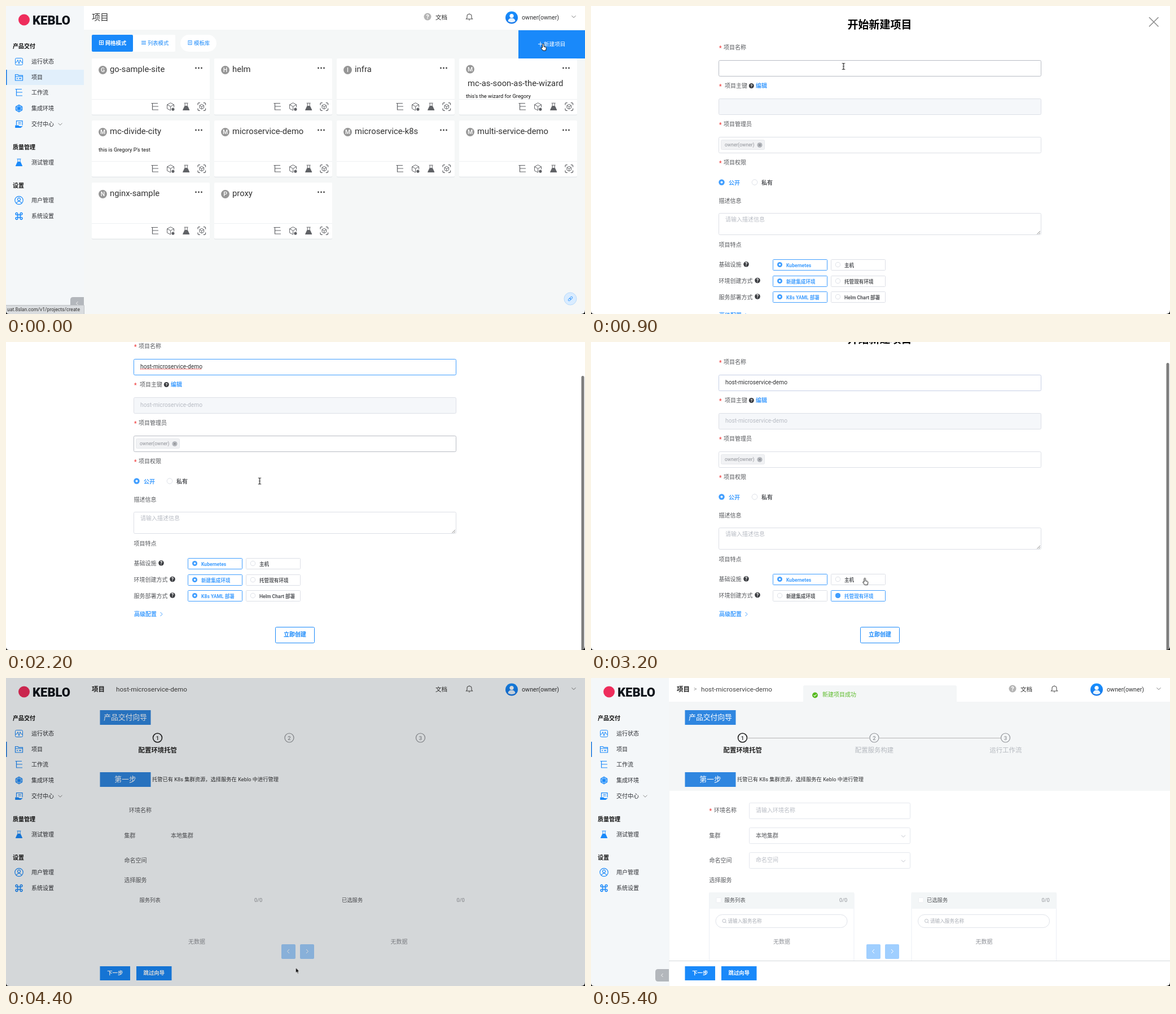
Animation of 1026x546 px, one loop 5500 ms. Source, as an HTML page:

```html
<!DOCTYPE html>
<html lang="zh-CN">
<head>
<meta charset="utf-8">
<title>新建项目</title>
<style>
html, body { margin: 0; width: 100%; height: 100%; overflow: hidden; background: #fff; }
svg { display: block; width: 1026px; height: 546px; }
text { font-family: Roboto, "Noto Sans CJK SC", "Noto Sans CJK", sans-serif; white-space: pre; }
[id^="k-"] { animation: 5500ms step-end infinite; }
.typed tspan { animation: typed 5500ms step-end infinite; }
@keyframes typed { 0% { fill-opacity: 1; } 60%, 100% { fill-opacity: 0; } }
</style>
</head>
<body>
<svg id="stage" viewBox="0 0 1026 546" xmlns="http://www.w3.org/2000/svg"></svg>
<script>
const LOOP = 5500;
const BLUE = '#1989fa', SKY = '#409eff', INK = '#303133', MID = '#56585c',
      PALE = '#b8bcc4', EDGE = '#dcdfe6', SIDE = '#f4f7f9', GROUND = '#f4f6f7';
const PROJECT = 'host-microservice-demo', BRAND = 'Keblo', USER = 'owner(owner)';

// ---- drawing helpers; text is placed by its vertical centre ----
const text = (x, y, s, size = 10, fill = INK, weight = 400, more = '') =>
  `<text x="${x}" y="${(y + size * .37).toFixed(2)}" font-size="${size}" fill="${fill}" font-weight="${weight}" ${more}>${s}</text>`;
const mid = (x, y, s, size, fill, weight) => text(x, y, s, size, fill, weight, 'text-anchor="middle"');
const rect = (x, y, w, h, fill, stroke = 'none', r = 0, more = '') =>
  `<rect x="${x}" y="${y}" width="${w}" height="${h}" fill="${fill}" stroke="${stroke}" rx="${r}" ${more}/>`;
const disc = (x, y, r, fill, stroke = 'none', w = 1) =>
  `<circle cx="${x}" cy="${y}" r="${r}" fill="${fill}" stroke="${stroke}" stroke-width="${w}"/>`;
const path = (d, stroke, w = 1, fill = 'none') =>
  `<path d="${d}" stroke="${stroke}" stroke-width="${w}" fill="${fill}"/>`;
const group = (body, id = '', more = '') => `<g ${id && `id="k-${id}"`} ${more}>${body}</g>`;
const cover = (fill, id, more) => group(rect(0, 0, 1026, 546, fill, 'none', 0, more), id);
const icon = (name, x, y, color = '#606266') => `<use href="#${name}" x="${x}" y="${y}" color="${color}"/>`;
const help = (x, y, r = 4.8, fill = '#3a3c40') => disc(x, y, r, fill) + mid(x, y, '?', r * 1.7, '#fff', 700);
const down = (x, y, c) => path(`M${x - 3.5} ${y - 1.8}l3.5 3.5 3.5-3.5`, c);
const repeat = (list, fn) => list.map(fn).join('');

const CC = 'currentColor';
const symbols = {
  flow: path('M-6.5-6H5M-4.5-6V5.5H6M-4.5-.5H6', CC, 1.2),
  box: path('M0 6.5L-6 3.5V-3.5L0-6.8 6-3.5V1M-6-3.5L0-.3 6-3.5M0-.3V6.5', CC) + disc(4.3, 4.6, 2.6, CC),
  flask: path('M-3.5-6.3H3.5M-2-6V-2L-5.6 6H5.6L2-2V-6', CC) + path('M-3.6 1.5H3.6L5.8 6.5H-5.8Z', 'none', 0, CC)
    + path('M-2-1.5H2L3.6 2H-3.6Z', 'none', 0, CC),
  scan: path('M-6.8-3V-4.8Q-6.8-6.8-4.8-6.8H-3M3-6.8H4.8Q6.8-6.8 6.8-4.8V-3M6.8 3V4.8Q6.8 6.8 4.8 6.8H3M-3 6.8H-4.8Q-6.8 6.8-6.8 4.8V3', CC, 1.2)
    + path('M0-4.3L3.8-2.1V2.1L0 4.3-3.8 2.1V-2.1ZM-3.8-2.1L0 0 3.8-2.1M0 0V4.3', CC),
  pulse: rect(-6.5, -6, 13, 12, 'none', CC, 2) + path('M-6.5 1H-4L-2-3 0 4 2-3 4 1H6.5', CC),
  folder: path('M-6.5 5.5V-5H-2L-.5-3.3H6.5V5.5ZM-6.5-1.5H6.5', CC, 1.2) + path('M-4 2H-2M0 2H4', CC, 1.4),
  cluster: path('M0-6.5L5.8-3.2V3.2L0 6.5-5.8 3.2V-3.2Z', CC, 1, '#7cbcfb') + disc(0, 0, 2.6, CC)
    + path('M0-6V6M-5-3L5 3M5-3L-5 3', CC, .9),
  hand: path('M-4.5 2V-5.8H6V2M-1.5-3H3.5M-1.5-.5H3.5', CC, 1.2) + path('M-6.8 2H-1L1 3.5H6.8L3 6.5H-6.8Z', 'none', 0, CC),
  user: disc(0, 0, 7.2, 'none', CC, 1.2) + disc(0, -1.8, 2.5, 'none', CC, 1.2) + path('M-4.5 5.2Q-3.5 2 0 2T4.5 5.2', CC, 1.2),
  command: rect(-2.3, -2.3, 4.6, 4.6, 'none', CC, 0, 'stroke-width="1.5"')
    + repeat([[-1, -1], [1, -1], [-1, 1], [1, 1]], ([a, b]) => disc(4 * a, 4 * b, 1.9, 'none', CC, 1.5)),
  bell: path('M-5.5 3.5H5.5L4 1.5V-1.5Q4-5 0-5T-4-1.5V1.5ZM-1.2 5.3H1.2M0-6.3V-5', CC, 1.1),
};
const defs = `<defs>${Object.entries(symbols).map(([n, b]) => `<g id="${n}">${b}</g>`).join('')}
  <linearGradient id="avatar" x2="0" y2="1"><stop stop-color="#1890ff"/><stop offset="1" stop-color="#1677e8"/></linearGradient></defs>`;

// ---- shared chrome ----
const menu = [
  ['pulse', 98, '运行状态'], ['folder', 126, '项目'], ['flow', 153, '工作流'], ['cluster', 181, '集成环境'],
  ['hand', 209, '交付中心'], ['flask', 277, '测试管理'], ['user', 344, '用户管理'], ['command', 372, '系统设置'],
];
const sidebar = disc(32, 24.5, 10, '#ee2d5c')
  + text(47, 24.8, BRAND.toUpperCase(), 22, '#10151c', 900)
  + repeat([[71, '产品交付'], [250, '质量管理'], [318, '设置']], ([y, s]) => text(12, y, s, 10, '#111', 700))
  + repeat(menu, ([n, y, s]) => icon(n, 23, y + .5, BLUE) + text(45, y, s, 10, '#2c2e33'))
  + down(96, 209.5, '#888') + rect(0, 113, 1.5, 27, '#1677e0');
const account = text(761, 20, '文档', 10.6, '#333') + icon('bell', 821, 19.5, '#555')
  + disc(896, 20.5, 11, 'url(#avatar)') + disc(896, 17.5, 3.6, '#fff') + path('M889.5 27Q890 21.5 896 21.5T902.5 27Q896 31 889.5 27', 'none', 0, '#e6f3ff')
  + text(914, 20, USER, 10.7, INK) + down(1006, 19, '#777');
const fold = path('M138 516H119Q114 516 114 521V533Q114 538 119 538H138Z', 'none', 0, '#b3b7bc')
  + path('M127.5 524l-3 3 3 3', '#f5f5f5');

// ---- project list ----
const cards = ['go-sample-site', 'helm', 'infra', 'mc-as-soon-as-the-wizard', 'mc-divide-city',
  'microservice-demo', 'microservice-k8s', 'multi-service-demo', 'nginx-sample', 'proxy'];
const notes = { 3: [12, 67, "this's the wizard for Gregory"], 4: [12, 52, "this is Gregory P's test"] };
const card = (name, i) => {
  const wrap = i === 3, note = notes[i];
  return group(
    rect(0, 1, 209, 100, '#e6e9eb', 'none', 2) + rect(0, 0, 209, 99.5, '#fff', 'none', 2)
    + path('M0 72.5H209', '#eef0f3')
    + disc(19.5, wrap ? 19 : 20.5, 7.4, '#969696') + mid(19.5, wrap ? 19 : 20.5, name[0].toUpperCase(), 10.5, '#fff', 500)
    + (wrap ? text(15, 44, name, 14.8, '#333') : text(32, 19, name, 14.8, '#333'))
    + repeat([184.5, 189.5, 194.5], x => disc(x, 17, 1.4, '#444'))
    + (note ? text(note[0], note[1], note[2], 9.3, '#111') : '')
    + repeat(['flow', 'box', 'flask', 'scan'], (n, k) => icon(n, 112 + 27.6 * k, 85.5)),
    '', `transform="translate(${152 + 217 * (i % 4)} ${93 + 110 * Math.floor(i / 4)})"`);
};
const listPage = rect(0, 0, 1026, 546, '#f5f7f7') + rect(138, 0, 888, 42, '#fff')
  + rect(0, 0, 138, 546, SIDE) + rect(0, 113, 138, 27, '#e1effb') + sidebar
  + text(152, 19, '项目', 15, '#333') + help(747, 19, 6.5, '#b4b4b4') + account
  + rect(152, 51, 73, 30, BLUE, 'none', 2) + text(176, 65.5, '网格模式', 9.3, '#fff', 700)
  + rect(165.5, 61.5, 7, 7, 'none', '#fff') + path('M169 61.5V68.5M165.5 65H172.5', '#fff')
  + rect(225, 51, 75, 30, '#fff', 'none', 2) + text(251, 65.5, '列表模式', 9.3, BLUE, 500)
  + path('M240 62.5H248M240 65H248M240 67.5H248', BLUE)
  + rect(309, 51, 64, 30, '#fff', 'none', 15) + text(333, 65.5, '模板库', 9.4, BLUE, 500)
  + rect(323, 61.5, 6, 7, 'none', SKY) + path('M324.5 64H327.5M324.5 66H327.5', SKY)
  + rect(908, 43, 118, 50, BLUE) + path('M943 67.5H951M947 63.5V71.5', '#fff', .9) + text(953, 67.5, '新建项目', 9.6, '#fff')
  + cards.map(card).join('') + fold
  + disc(1000, 519, 11, '#d9ecff', '#b7dafc')
  + group(rect(-4.6, -1.6, 5, 3.2, 'none', SKY, 1.6) + rect(-.4, -1.6, 5, 3.2, 'none', SKY, 1.6), '', 'transform="translate(1000 519) rotate(-45)"')
  + cover('#000', 'shade', 'opacity=".15"');

// ---- new project form ----
const star = (x, y) => text(x, y + 1, '*', 10, '#f04040', 700);
const label = (y, s, x = 235) => star(227, y) + text(x, y, s, 10, MID, 500);
const field = (y, fill = '#fff', id = '') => rect(226.5, y, 571, 28, fill, EDGE, 2, id && `id="k-${id}"`);
const radio = (x, y, r, on) => on ? disc(x, y, r, SKY) + disc(x, y, r * .38, '#fff') : disc(x, y, r - .4, '#fff', EDGE);
const option = (x, y, s, on) => rect(x, y, 96, 19, '#fff', on ? SKY : EDGE, 1)
  + radio(x + 12, y + 9, 4.5, on) + text(x + 23.5, y + 10.3, s, 8.6, on ? SKY : MID, 700);
const row = (y, a, b, first) => option(322.5, y, a, first) + option(425.5, y, b, !first);
const typed = (y, fill) => text(238, y, [...PROJECT].map((c, i) =>
  `<tspan style="animation-delay:${1498 + 100 * Math.floor(i * 6 / PROJECT.length) - LOOP}ms">${c}</tspan>`).join(''), 10.2, fill, 400, 'class="typed"');
const envRow = ['新建集成环境', '托管现有环境'];
const submit = (fill, ink) => rect(477.5, 571.5, 69, 28, fill, BLUE, 2) + mid(512, 584.5, '立即创建', 10, ink, 700);

const form = mid(511.5, 33, '开始新建项目', 19, '#000', 700)
  + path('M989 20L1005.5 36.5M1005.5 20L989 36.5', '#8a8a8a', 1.5)
  + label(73.5, '项目名称') + field(96.5, '#fff', 'name') + typed(109.5, INK)
  + group('<path d="M238 114H347" stroke="#f05050" stroke-width="1.6" stroke-dasharray="1.6 1.2"/>', 'spell')
  + label(141.5, '项目主键', 237) + help(284.3, 141.5, 4.5) + text(292, 141.5, '编辑', 10, SKY, 700)
  + field(164.5, '#f5f7fa') + typed(177.5, PALE)
  + label(209.5, '项目管理员') + field(232.5, '#fff', 'owner')
  + rect(230.5, 237.5, 77, 17, '#f1f2f4', '#e6e8ec', 2) + text(237, 246, USER, 8.5, '#909399')
  + disc(299, 246.5, 4.6, '#b4b7bd') + path('M297.3 244.8l3.4 3.4M300.7 244.8l-3.4 3.4', '#777', .9)
  + label(277, '项目权限')
  + radio(231.5, 312.5, 5.2, true) + text(244, 312.8, '公开', 10, SKY, 700)
  + radio(290, 312.5, 5.2, false) + text(302, 312.8, '私有', 10, MID, 700)
  + text(226.5, 345, '描述信息', 10, MID, 500)
  + rect(226.5, 367.5, 571, 38, '#fff', EDGE, 2) + text(238, 378.5, '请输入描述信息', 10, PALE)
  + path('M790.5 404.5l5.5-5.5M793.5 404.5l2.5-2.5', '#777', .9)
  + text(226.5, 423, '项目特点', 10, MID, 500)
  + text(226.5, 458.5, '基础设施', 10, MID, 500) + help(275, 457.8) + row(449.5, 'Kubernetes', '主机', true)
  + text(226.5, 487.5, '环境创建方式', 10, MID, 500) + help(295, 486.5)
  + group(row(478.5, ...envRow, true) + text(226.5, 516, '服务部署方式', 10, MID, 500) + help(295, 515)
    + row(506.5, 'K8s YAML 部署', 'Helm Chart 部署', true), 'fresh')
  + group(row(478.5, ...envRow, false) + group(disc(437.5, 487.5, 4.5, SKY), 'fill'), 'hosted')
  + group(text(227, 548.5, '高级配置', 10, SKY, 700) + path('M273.5 545l3.5 3.5-3.5 3.5', SKY)
    + submit('#fff', BLUE) + group(submit(BLUE, '#fff'), 'hover'), 'tail');
const formPage = rect(0, 0, 1026, 546, '#fff') + group(form, 'scroll')
  + group(rect(1019.5, 0, 5, 546, '#7d7d7d', 'none', 2.5), 'thumb');

// ---- delivery wizard: light parts lie under the closing veil ----
const input = (y, s, fill, arrow) => rect(280.5, y, 285, 28, '#fff', '#e4e7ed', 2) + text(292, y + 13, s, 10, fill)
  + (arrow ? down(553.5, y + 15, '#c0c4cc') : '');
const panel = x => rect(x, 380.5, 256.5, 123, '#fff', '#ebeef5', 2) + rect(x, 380, 256.5, 29, '#f3f6f7')
  + rect(x + 12.5, 389.5, 8.5, 8.5, '#fff', '#eceef2', 1)
  + rect(x + 11.5, 419.5, 233, 23, '#fff', '#e0e3ea', 11.5)
  + disc(x + 26.5, 430.5, 3, 'none', PALE) + path(`M${x + 28.5} 432.5l2 2`, PALE) + text(x + 33, 430.5, '请输入服务名称', 8.6, '#a9adb5');
const light = rect(0, 0, 1026, 546, GROUND) + rect(138, 0, 888, 42, '#fff') + rect(0, 0, 138, 546, SIDE)
  + rect(139, 200, 887, 346, '#fff') + text(182, 19.5, '>', 10.5, '#999') + help(747, 19, 6.5, '#b4b4b4')
  + path('M278 106.5H493M511 106.5H726', '#b5b5b5')
  + mid(502, 127.5, '配置服务构建', 11.4, '#b5b9bf') + mid(734.8, 127.5, '运行工作流', 11.4, '#b5b9bf')
  + star(209.5, 234) + input(221.5, '请输入环境名称', PALE) + input(265.5, '', INK, true) + input(309.5, '命名空间', PALE, true)
  + panel(209.5) + panel(568) + rect(139, 502, 887, 44, '#fff') + path('M138 501.5H1026', '#d5d8dc') + fold;
const banner = (y, s) => rect(166.5, y, 90, 26, '#2f86e0') + mid(211.5, y + 11.8, s, 12.8, '#fff');
const step = (x, n, c, w) => disc(x, 106, 8, 'none', c, w) + mid(x, 106, n, 9.5, c, 500);
const lists = (x, s) => text(x + 27, 394, s, 9.3, MID, 500) + text(x + 230.5, 394, '0/0', 9.3, '#909399')
  + text(x + 113.5, 467, '无数据', 10, '#909399');
const bold = sidebar + account + text(152, 19.5, '项目', 11.5, '#222', 700) + text(195, 19.5, PROJECT, 11.7, '#444')
  + banner(57, '产品交付向导') + banner(167, '第一步')
  + text(259, 180, `托管已有 K8s 集群资源，选择服务在 ${BRAND} 中进行管理`, 9.25, INK)
  + step(268.5, 1, '#222', 1.6) + step(502, 2, '#909398', 1.2) + step(734.5, 3, '#909398', 1.2)
  + mid(268.8, 127.5, '配置环境托管', 11.4, '#222', 700)
  + text(218, 234, '环境名称', 10, MID) + text(209.5, 279, '集群', 10, MID) + text(292, 279, '本地集群', 10, MID)
  + text(209.5, 323, '命名空间', 10, MID) + text(209.5, 358.5, '选择服务', 10, MID)
  + lists(209.5, '服务列表') + lists(568, '已选服务')
  + rect(488, 472, 25, 26, '#a0cfff', 'none', 2) + rect(521, 472, 25, 26, '#a0cfff', 'none', 2)
  + path('M502 481l-3.5 3.5 3.5 3.5M532 481l3.5 3.5-3.5 3.5', '#fff')
  + rect(166.5, 511, 53.5, 25, BLUE) + mid(193.3, 522.5, '下一步', 9.4, '#fff', 700)
  + rect(231, 511, 62.5, 25, BLUE) + mid(262.3, 522.5, '跳过向导', 9.4, '#fff', 700);
const toast = rect(376, 13, 272, 35, GROUND, 'none', 3) + disc(397, 30.5, 4.9, '#56b91f')
  + path('M394.6 30.5l1.8 1.8 3.2-3.4', '#fff', 1.1) + text(410, 29.7, '新建项目成功', 10, '#5cbb2a');
const wizardPage = light + cover('#fafdff', 'veil') + bold + cover('#000', 'dim', 'opacity=".15"') + group(toast, 'toast');

// ---- pointer ----
const pointer = group(path('M-2.5 1V-4.5Q-2.5-6-1.3-6T0-4.5V-1L3.2-.2Q4.5.2 4.3 1.8L3.5 6H-1.5L-4.5 2Q-5 .5-3.8.6Z', '#111', 1, '#fff'), 'hand')
  + group(path('M-2.5-5.5Q0-5.5 0-4Q0-5.5 2.5-5.5M0-4.5V4.5M-2.5 5.5Q0 5.5 0 4Q0 5.5 2.5 5.5M-1.2 0H1.2', '#222', 1.2), 'beam')
  + group(path('M0-5V4.3L2.1 2.4 3.6 5.7 5.1 5 3.6 1.9H6.3Z', '#fff', .7, '#000'), 'arrow');

document.getElementById('stage').innerHTML = defs
  + group(listPage, 'list') + group(formPage, 'form') + group(wizardPage, 'wizard')
  + group(rect(0, 531, 138, 15, '#d9dcdf') + path('M0 530.5H138.5V546', '#c0c3c6') + text(2, 538, 'uat.8slan.com/v1/projects/create', 8.6, '#333'), 'status')
  + group(pointer, 'pointer')
  + path('M0 541Q0 546 6 546H0ZM1026 539Q1026 546 1019 546H1026Z', 'none', 0, '#111');

// ---- timing: [ms, value, steps until the next entry] ----
const tracks = {};
const track = (id, prop, list) => { (tracks[id] ||= []).push([prop, list]); };
const show = (id, ...spans) => track(id, 'opacity',
  [...(spans[0][0] ? [[0, 0]] : []), ...spans.flatMap(([a, b]) => b < LOOP ? [[a, 1], [b, 0]] : [[a, 1]])]);
const move = (id, list) => track(id, 'transform', list.map(([t, x, y, n]) => [t, `translate(${x}px,${y}px)`, n]));

show('list', [0, 4400]);
show('shade', [100, 300]);
track('form', 'opacity', [[0, 0], [100, .2], [200, .7], [300, 1], [4400, 0]]);
show('wizard', [4400, LOOP]);
show('veil', [4400, 4500]);
show('dim', [4400, 4500]);
show('status', [0, 700]);
move('scroll', [[0, 0, 0], [2100, 0, -35], [2200, 0, -66], [3100, 0, -38]]);
move('thumb', [[0, 0, 560], [2100, 0, 32], [2200, 0, 60], [3100, 0, 37]]);
track('thumb', 'opacity', [[0, 1], [3500, .5], [3600, 0]]);
move('tail', [[0, 0, 0], [3100, 0, -28]]);
track('name', 'stroke', [[0, EDGE], [800, PALE], [1000, SKY], [3100, '#c6cfe6'], [3400, EDGE]]);
track('owner', 'stroke', [[0, EDGE], [2000, PALE], [2500, EDGE]]);
show('spell', [2000, 3100]);
show('fresh', [0, 3100]);
show('hosted', [3100, LOOP]);
show('fill', [3100, 3300]);
show('hover', [4000, LOOP]);
track('toast', 'opacity', [[0, 0], [4900, .4], [5000, .8], [5100, 1]]);
move('toast', [[0, 0, -22], [5000, 0, -7], [5100, 0, 0]]);
move('pointer', [[0, 953, 73], [100, 953, 73, 8], [900, 447.5, 107], [1500, 447.5, 107, 5], [2000, 449.5, 246.5],
  [2400, 449.5, 246.5, 6], [3000, 486.5, 424.5], [3600, 486.5, 424.5, 5], [4100, 513.5, 518.5]]);
show('pointer', [0, 5000]);
show('hand', [0, 200], [3000, 3800]);
show('beam', [700, 2500]);
show('arrow', [200, 700], [2500, 3000], [3800, LOOP]);

// Stops sit 2 ms early so a picture taken on the beat shows the new state.
const at = t => Math.max(0, (t - 2) / LOOP * 100).toFixed(4) + '%';
let css = '';
for (const [id, props] of Object.entries(tracks)) {
  const names = props.map(([prop, list]) => {
    const stops = [...list, [LOOP + 2, list[list.length - 1][1]]];
    css += `@keyframes ${id}-${prop}{${stops.map(([t, v, n = 1]) =>
      `${at(t)}{${prop}:${v};animation-timing-function:steps(${n},end)}`).join('')}}`;
    return `${id}-${prop}`;
  });
  css += `#k-${id}{animation-name:${names.join(',')}}`;
}
document.head.appendChild(document.createElement('style')).textContent = css;
</script>
</body>
</html>
```
